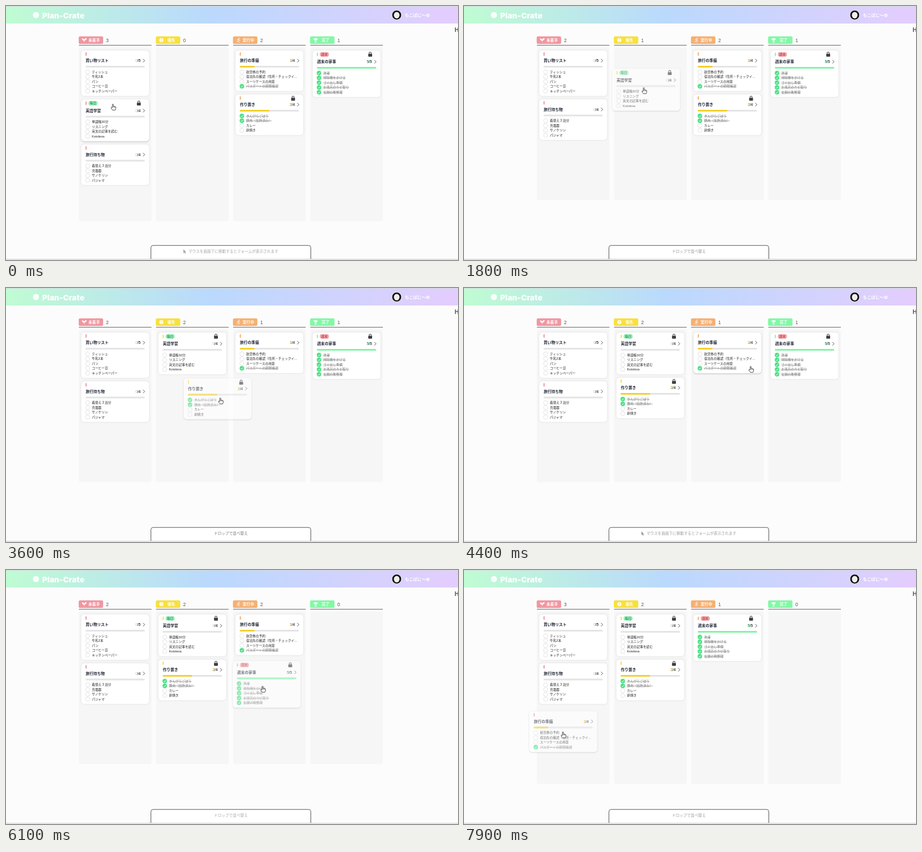
Recreate the animation shown at these times as an HTML page. Size 800 by 450 pixels, loop 8 s.

```html
<!DOCTYPE html>
<html lang="ja">
<head>
<meta charset="utf-8">
<style>
  html, body { margin: 0; width: 100%; height: 100%; overflow: hidden; background: #fcfcfd; }
  svg { display: block; width: 800px; height: 450px; }
  text { font-family: "Liberation Sans", "Noto Sans CJK JP", "Noto Sans CJK", sans-serif; white-space: pre; }
  .brand { font-family: Inter, sans-serif; }
  .card { filter: drop-shadow(0 .4px .8px rgba(0, 0, 0, .1)); }
  .hover { filter: drop-shadow(0 1px 1.3px rgba(0, 0, 0, .2)); }
</style>
</head>
<body>
<svg viewBox="0 0 800 450" xmlns="http://www.w3.org/2000/svg">
  <defs>
    <linearGradient id="sky">
      <stop offset="0" stop-color="#bffcd2"/>
      <stop offset=".45" stop-color="#bad9fd"/>
      <stop offset="1" stop-color="#e4cdfe"/>
    </linearGradient>
  </defs>
  <g id="stage"></g>
</svg>
<script>
const LOOP = 8000, SETTLE = 250;
const LEFT = 129, PITCH = 136.5, WIDTH = 128.5, TOP = 78.5, GAP = 5.5;
const CARD_W = 120.5, BAR_W = 105;

const columns = [
  { name: '未着手', color: '#f1969f' },
  { name: '優先', color: '#f8e03e' },
  { name: '実行中', color: '#f5b071' },
  { name: '完了', color: '#82f8a5' },
];

const badgeIcons = [
  '<path d="M0 3.500V0M0 .8C-2.500 .8-3.700-.8-3.700-2.700C-1-2.700 0-1 0 .8C0-2 1-3.200 3.700-3.200C3.700-1 3 .3 0 .5" fill="#fff" stroke="#fff" stroke-width=".7"/>',
  '<circle r="3.600" fill="#fff"/><path d="M0-2V.4M0 1.300V2.200" stroke="#f0d62d" stroke-width="1.100"/>',
  '<circle cx="1" cy="-3.300" r=".9" fill="#fff"/><path d="M-2.600 0L-1.500-1.700L.6-1.500L-.4 1L1.200 2L.8 4M-.6 1.200L-1.400 2.700H-3M.8-1.200L1.600 0H3" fill="none" stroke="#fff" stroke-width=".9"/>',
  '<path d="M-2-3.500H2V-1Q2 1 0 1Q-2 1-2-1ZM-.5 1H.5V3H2V4H-2V3H-.5Z" fill="#fff"/><path d="M-2-2.500H-3.500Q-3.500 0-1.500 0M2-2.500H3.500Q3.500 0 1.500 0" fill="none" stroke="#fff" stroke-width=".8"/>',
];

// Items starting with "*" are checked.
const cards = {
  shop: { title: '買い物リスト', items: ['ティッシュ', '牛乳2本', 'パン', 'コーヒー豆', 'キッチンペーパー'] },
  study: { title: '英語学習', lock: true, tag: '毎日', tagFill: '#96f2b8', tagInk: '#1c6b42',
    items: ['単語帳30分', 'リスニング', '英文の記事を読む', 'Kotolexa'] },
  pack: { title: '旅行持ち物', items: ['着替え３泊分', '充電器', 'サノケリン', 'パジャマ'] },
  trip: { title: '旅行の準備', items: ['航空券の予約', '宿泊先の確認（住所・チェックイ...', 'スーツケースの用意', '*パスポートの期限確認'] },
  cook: { title: '作り置き', lock: true, items: ['*きんぴらごぼう', '*豚肉（加熱済み）', 'カレー', '卵焼き'] },
  home: { title: '週末の家事', lock: true, tag: '週末', tagFill: '#f9a3a9', tagInk: '#98333c',
    items: ['*洗濯', '*掃除機をかける', '*ゴミ出し準備', '*お風呂のカビ取り', '*玄関の靴整理'] },
};

const layouts = [
  [0, 'shop study pack||trip cook|home'],
  [1250, 'shop pack|study|trip cook|home'],
  [3450, 'shop pack|study cook|trip|home'],
  [5650, 'shop pack|study cook|trip home|'],
  [7350, 'shop pack|study cook|home trip|'],
  [7700, 'shop pack trip|study cook|home|'],
].map(([time, text]) => place(time, text.split('|').map(s => s.split(' ').filter(Boolean))));

// Keys are [time, x, y].
const drags = [
  { id: 'study', release: 2050, keys: [[700, 133, 165], [1250, 193, 141], [1800, 262, 111], [2050, 270, 81], [2250, 269.5, 78.5]] },
  { id: 'cook', release: 3850, keys: [[3150, 406, 156.5], [3650, 304, 160], [3850, 270, 159.5], [4000, 269.5, 158.5]] },
  { id: 'home', release: 6400, keys: [[5200, 542.5, 78.5], [5650, 476, 115], [6100, 401, 161], [6400, 406, 157], [6600, 406, 156.5]] },
  { id: 'trip', release: LOOP, keys: [[7150, 406, 78.5], [7400, 399, 128.5], [7900, 115.5, 250], [LOOP, 115.5, 250]] },
];

const pointer = [
  [0, 190, 179], [300, 190, 204], [700, 190, 204], [1250, 250, 180], [1800, 319, 150], [2050, 327, 120],
  [2300, 335, 122], [2900, 470, 194], [3150, 472, 196], [3650, 370, 200], [3850, 336, 199], [4000, 336, 199],
  [4400, 508, 144], [4800, 596, 129], [5200, 596, 129], [5650, 530, 165], [6100, 455, 211], [6400, 460, 207],
  [6600, 460, 207], [6900, 462, 131], [7150, 462, 131], [7400, 455, 181], [7900, 176, 292],
];

function cardHeight(id) {
  return 38.5 + 8.5 * cards[id].items.length + (cards[id].tag ? 2 : 0);
}

function place(time, lists) {
  const slots = {};
  let bottom = 0;
  lists.forEach((list, col) => {
    let y = TOP;
    for (const id of list) {
      slots[id] = { x: LEFT + 4 + col * PITCH, y, col };
      y += cardHeight(id) + GAP;
    }
    bottom = Math.max(bottom, y - GAP);
  });
  return { time, lists, slots, panelBottom: Math.max(344, bottom + 63.5) };
}

// Monotone cubic through the keys: smooth, without overshoot.
function track(keys, t) {
  const last = keys.length - 1;
  if (t >= keys[last][0]) return keys[last].slice(1);
  let i = 0;
  while (t >= keys[i + 1][0]) i++;
  const span = keys[i + 1][0] - keys[i][0], u = (t - keys[i][0]) / span;
  return [1, 2].map(axis => {
    const slope = k => k < 0 || k >= last ? 0 : (keys[k + 1][axis] - keys[k][axis]) / (keys[k + 1][0] - keys[k][0]);
    const tangent = k => {
      const a = slope(k - 1), b = slope(k);
      return a * b > 0 ? 2 * a * b / (a + b) : 0;
    };
    const a = keys[i][axis], b = keys[i + 1][axis], v = 1 - u;
    return a * v * v * (1 + 2 * u) + b * u * u * (3 - 2 * u) + span * u * v * (tangent(i) * v - tangent(i + 1) * u);
  });
}

const rect = (x, y, w, h, r, fill, extra = '') =>
  `<rect x="${x}" y="${y}" width="${w}" height="${h}" rx="${r}" fill="${fill}" ${extra}/>`;
const line = (d, color, width = 1) => `<path d="${d}" fill="none" stroke="${color}" stroke-width="${width}"/>`;
const at = (x, y, body, extra = '') => `<g transform="translate(${x} ${y})" ${extra}>${body}</g>`;
// y is the vertical middle of the glyphs.
const label = (x, y, size, color, str, extra = '') =>
  `<text x="${x}" y="${y + size * .37}" font-size="${size}" fill="${color}" ${extra}>${str}</text>`;
const MIDDLE = ' text-anchor="middle" ', BOLD = ' font-weight="700" ';

function drawItem(item, y) {
  const done = item[0] === '*';
  const str = done ? item.slice(1) : item;
  if (!done) return `<circle cx="11.5" cy="${y}" r="3.700" fill="#fff" stroke="#dcdcdf" stroke-width=".8"/>` + label(19, y, 5.7, '#222', str);
  return `<circle cx="11.5" cy="${y}" r="4" fill="#4be083"/>` +
    line(`M9.600 ${y + .2}l1.400 1.500l2.600-3.200`, '#fff', .9) +
    label(19, y, 5.7, '#777', str, 'text-decoration="line-through"');
}

function drawCard(id, x, y, col, hover, opacity = 1) {
  const { title, items, lock, tag, tagFill, tagInk } = cards[id];
  const shift = tag ? 2 : 0;
  const done = items.filter(s => s[0] === '*').length;
  const full = done === items.length;
  const doneInk = full ? '#26a65b' : done ? '#dfa913' : '#d0d2d6';
  const iconY = tag ? 7.3 : 6.5;
  let body = rect(0, 0, CARD_W, cardHeight(id), 5.5, '#fff', `stroke="#ececee" stroke-width=".6" class="${hover ? 'hover' : 'card'}"`) +
    rect(7.7, iconY - 3, 2, 6, .6, columns[col].color);
  if (tag) body += rect(13, iconY - 4, 16, 8, 3.5, tagFill) + label(21, iconY, 5.8, tagInk, tag, MIDDLE);
  if (lock) body += rect(98.7, 6.3, 6.8, 5, .8, '#3b3b40') + line('M100.300 6.500V5a1.800 1.800 0 0 1 3.600 0V6.500', '#3b3b40', 1.1);
  body += label(8, 18.4 + shift, 6.75, '#222836', title, BOLD) +
    label(105, 18.4 + shift, 6.5, '#3c3f46', `<tspan fill="${doneInk}">${done}</tspan>/${items.length}`, BOLD + 'text-anchor="end"') +
    line(`M109.500 ${15.3 + shift}l3 3l-3 3`, '#444', .9) +
    rect(7.7, 27.5 + shift, BAR_W, 3, 1.5, '#e4e4e7');
  if (done) body += rect(7.7, 27.5 + shift, BAR_W * done / items.length, 3, 1.5, full ? '#82f4a7' : '#f3d02f');
  body += items.map((item, i) => drawItem(item, 38.3 + shift + i * 8.5)).join('');
  return at(x, y, body, `opacity="${opacity}"`);
}

function drawColumn(col, layout) {
  const x = LEFT + col * PITCH, { name, color } = columns[col];
  return rect(x, 74, WIDTH, layout.panelBottom - 74, 3, '#f6f6f7') +
    rect(x - .3, 53.8, 43.2, 13.4, 2.5, color) +
    at(x + 9.5, 60.5, badgeIcons[col]) +
    label(x + 27, 60.5, 6.8, '#fff', name, MIDDLE + BOLD) +
    label(x + 48, 60.5, 8.5, '#555', layout.lists[col].length) +
    line(`M${x} 69.500h${WIDTH}`, '#66666a');
}

const header = rect(0, 0, 800, 31, 0, 'url(#sky)') + rect(0, 0, 800, 1, 0, '#d3d9de') +
  '<circle cx="53" cy="16" r="5.500" fill="#fff" opacity=".9"/>' +
  label(64, 16.5, 13.8, '#fff', 'Plan-Crate', 'class="brand" font-weight="900" opacity=".92"') +
  '<circle cx="691.500" cy="16" r="8.500" fill="#111" stroke="#fff" stroke-width=".8"/>' +
  '<ellipse cx="691.500" cy="16.200" rx="5" ry="5.800" fill="#f1efec"/>' +
  label(706, 16, 7.4, '#fff', 'もこぽに〜ゆ', BOLD) +
  label(794, 42.5, 10.5, '#555', 'H', BOLD);

const footer = rect(256.5, 424.2, 283, 30, 4, '#fff', 'stroke="#55555a"') +
  rect(0, 448, 800, 2, 0, '#fcfcfd') + rect(0, 448, 800, 1.2, 0, '#cfcfd2');

const hand = '<path d="M-1.800 1.200V-4.300a.9.9 0 0 1 1.800 0V-1.200q1-.7 1.600.2q1-.4 1.400.4q1.300-.3 1.300 1V2.400q0 1.600-1 3H-1.500Q-3 3.500-4.100 1.600Q-4.200.3-3 .5Z" fill="#fff" stroke="#222" stroke-width=".8" stroke-linejoin="round"/>' +
  line('M0-1.200V1M1.600-1V1M3-.6V1', '#222', .5);
const arrow = '<path d="M0-4V3L1.700 1.600L2.900 4L4 3.500L2.800 1.200H5Z" fill="#555"/>';

function drawHint(t, dragging) {
  const opacity = .75 - .25 * Math.cos((t - 150) / 1000 * Math.PI);
  const body = dragging
    ? label(398, 435, 6.65, '#555', 'ドロップで並べ替え', MIDDLE)
    : at(314, 435, arrow) + label(323, 435, 6.63, '#555', 'マウスを画面下に移動するとフォームが表示されます');
  return `<g opacity="${opacity}">${body}</g>`;
}

function render(t) {
  const index = layouts.findLastIndex(l => l.time <= t);
  const layout = layouts[index], before = layouts[Math.max(0, index - 1)];
  const u = Math.min(1, (t - layout.time) / SETTLE), ease = u * u * (3 - 2 * u);
  const drag = drags.find(d => t >= d.keys[0][0] && t < d.keys.at(-1)[0]);
  const [px, py] = track(pointer, t);

  let out = header + columns.map((_, col) => drawColumn(col, layout)).join('');
  for (const [id, slot] of Object.entries(layout.slots)) {
    if (drag && drag.id === id) continue;
    const from = before.slots[id];
    const y = from.y + (slot.y - from.y) * ease;
    const hover = !drag && px > slot.x && px < slot.x + CARD_W && py - 5 > y && py - 5 < y + cardHeight(id);
    out += drawCard(id, slot.x, y, slot.col, hover);
  }
  if (drag) {
    const [x, y] = track(drag.keys, t);
    out += drawCard(drag.id, x, y, layout.slots[drag.id].col, true, .6);
  }
  out += footer + drawHint(t, drag && t < drag.release) + at(px, py, hand);
  document.getElementById('stage').innerHTML = out;
}

function tick() {
  render(performance.now() % LOOP);
  requestAnimationFrame(tick);
}
tick();
</script>
</body>
</html>
```
